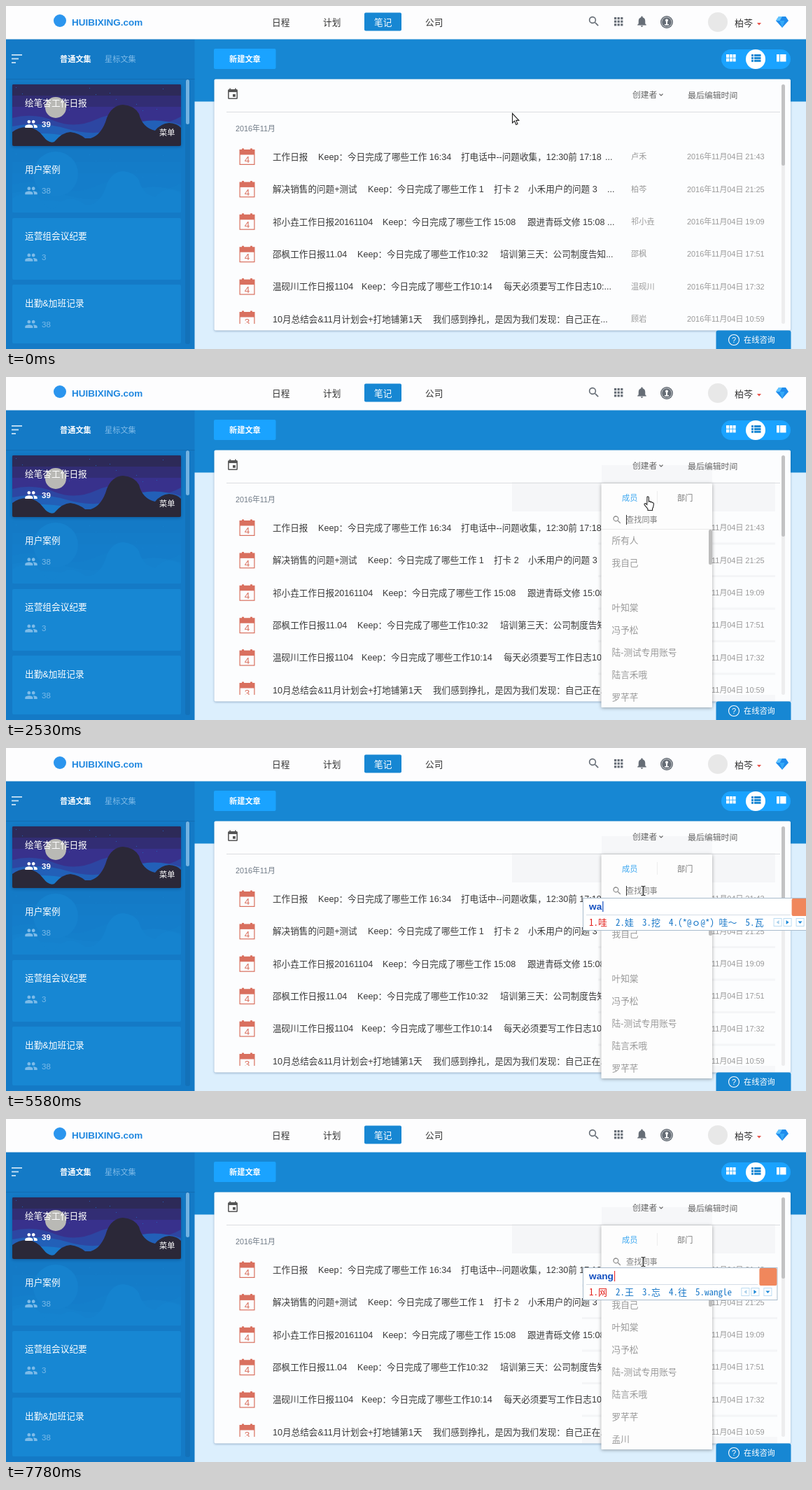
Animation, 1143 px wide and 490 px high, one loop 8 s. Source, as an HTML page with a canvas:

```html
<!DOCTYPE html>
<html lang="zh-CN">
<head>
<meta charset="utf-8">
<style>
html, body { margin: 0; width: 100%; height: 100%; overflow: hidden; }
canvas { display: block; }
</style>
</head>
<body>
<canvas id="stage" width="1143" height="490"></canvas>
<script>
const ctx = document.getElementById('stage').getContext('2d');
const LOOP = 8000;
const SANS = '"Liberation Sans", "Noto Sans CJK SC", "Noto Sans CJK", sans-serif';
const MONO = '"Noto Sans Mono CJK SC", "Noto Sans CJK SC", monospace';
const BLUE = '#1787d3', BRIGHT = '#1aa3ff', RED = '#d9705f';

const ICONS = {
  people: 'M16 11c1.66 0 3-1.34 3-3s-1.34-3-3-3-3 1.34-3 3 1.34 3 3 3zm-8 0c1.66 0 3-1.34 3-3S9.66 5 8 5 5 6.34 5 8s1.34 3 3 3zm0 2c-2.33 0-7 1.17-7 3.5V19h14v-2.5c0-2.33-4.67-3.5-7-3.5zm8 0c-.3 0-.6 0-1 .05 1.2.84 2 1.97 2 3.45V19h6v-2.5c0-2.33-4.67-3.5-7-3.5z',
  search: 'M15.5 14h-.8l-.3-.3A6.5 6.5 0 1 0 13.7 14.4l.3.3v.8l5 5 1.5-1.5zm-6 0a4.5 4.5 0 1 1 0-9 4.5 4.5 0 0 1 0 9z',
  bell: 'M12 22c1.1 0 2-.9 2-2h-4c0 1.1.9 2 2 2zm6-6v-5c0-3-1.6-5.6-4.5-6.3V4a1.5 1.5 0 0 0-3 0v.7C7.6 5.4 6 7.9 6 11v5l-2 2v1h16v-1z',
  event: 'M17 12h-5v5h5zM16 1v2H8V1H6v2H5a2 2 0 0 0-2 2v14a2 2 0 0 0 2 2h14a2 2 0 0 0 2-2V5a2 2 0 0 0-2-2h-1V1zm3 18H5V8h14z'
};

const CURSORS = {
  arrow: 'M.5.5V14L3.6 11.2 5.8 16.4 8 15.4 5.8 10.4H9.8Z',
  hand: 'M5 1.2C6 .4 7.4 1 7.4 2.4V8C8.4 7.2 9.8 7.6 10 8.7 11 8 12.2 8.5 12.4 9.6 13.6 9.2 14.6 10 14.5 11.4L13.6 16.4 12.6 18V20.5H6V18.4L1.2 12.6C.4 11.2 2 10 3.2 11L4.8 12.4Z'
};

const ENTRIES = [
  ['卢禾', '21:43', [381, '工作日报'], [446, 'Keep：今日完成了哪些工作 16:34'], [650, '打电话中--问题收集，12:30前 17:18'], [856, '...']],
  ['柏芩', '21:25', [381, '解决销售的问题+测试'], [517, 'Keep：今日完成了哪些工作 1'], [697, '打卡 2'], [746, '小禾用户的问题 3'], [859, '...']],
  ['祁小垚', '19:09', [381, '祁小垚工作日报20161104'], [538, 'Keep：今日完成了哪些工作 15:08'], [745, '跟进青砾文修 15:08 ...']],
  ['邵枫', '17:51', [381, '邵枫工作日报11.04'], [502, 'Keep：今日完成了哪些工作10:32'], [706, '培训第三天：公司制度告知...']],
  ['温砚川', '17:32', [381, '温砚川工作日报1104'], [508, 'Keep：今日完成了哪些工作10:14'], [711, '每天必须要写工作日志10:...']],
  ['顾岩', '10:59', [381, '10月总结会&11月计划会+打地铺第1天'], [610, '我们感到挣扎，是因为我们发现：自己正在...']]
];

const MEMBERS = ['叶知棠', '冯予松', '陆-测试专用账号', '陆言禾哦', '罗芊芊', '孟川'];
const EVERYONE = ['所有人', '我自己'];
const LISTS = [
  [0, [...EVERYONE, '', ...MEMBERS.slice(0, 5)]],
  [6150, ['王知砚', '王予禾', '王芊棠']],
  [7080, [...EVERYONE, ...MEMBERS]]
];

const CANDIDATES = {
  w: ['我', '为', '无', '完', '玩'],
  wa: ['哇', '娃', '挖', '(*@ｏ@*) 哇～', '瓦'],
  wan: ['玩', '万', '完', '晚', '弯'],
  wang: ['网', '王', '忘', '往', 'wangle']
};

// [time, x, y, typed letters]
const IME = [
  [0], [5330, 886, 214, 'w'], [5580, 824, 214, 'wa'], [5730, 824, 214, 'wan'], [5880, 824, 214, 'wang'],
  [6150], [7390, 886, 212, 'w'], [7540, 824, 212, 'wa'], [7660, 824, 212, 'wan'], [7780, 824, 212, 'wang']
];

// [time, kind, x, y]
const POINTER = [
  [0, 'arrow', 723, 153], [680, 'arrow', 790, 185], [800, 'arrow', 868, 196], [920, 'arrow', 902, 161],
  [1070, 'arrow', 907, 149], [1190, 'arrow', 909, 138], [1310, 'hand', 908, 127], [1460, 'hand', 908, 126],
  [2290, 'hand', 909, 138], [2410, 'hand', 910, 156], [2530, 'hand', 911, 170],
  [2650, 'beam', 910, 201], [2800, 'beam', 910, 197]
];

// [on, off, x]
const CARET = [
  [2170, 2650, 886], [3230, 3750, 886], [4310, 4770, 886], [5330, 5880, 886],
  [6150, 6680, 899], [7080, 7660, 886]
];

const stateAt = (steps, t) => steps.findLast(s => s[0] <= t);

function rect(x, y, w, h, color, radius = 0) {
  ctx.fillStyle = color;
  ctx.beginPath();
  ctx.roundRect(x, y, w, h, radius);
  ctx.fill();
}

function circle(x, y, r, color) {
  ctx.fillStyle = color;
  ctx.beginPath();
  ctx.arc(x, y, r, 0, 7);
  ctx.fill();
}

// cy is the vertical centre of the glyphs
function text(s, x, cy, color, size = 12.7, weight = 400, family = SANS) {
  ctx.font = `${weight} ${size}px ${family}`;
  ctx.fillStyle = color;
  ctx.fillText(s, x, cy + size * 0.38);
}

function path(d, x, y, fill, stroke, scale = 1) {
  const shape = new Path2D(d);
  ctx.save();
  ctx.translate(x, y);
  ctx.scale(scale, scale);
  if (fill) { ctx.fillStyle = fill; ctx.fill(shape); }
  if (stroke) { ctx.strokeStyle = stroke; ctx.stroke(shape); }
  ctx.restore();
}

const icon = (name, cx, cy, size, color) =>
  path(ICONS[name], cx - size / 2, cy - size / 2, color, null, size / 24);

function shadow(color, blur, dy = 1) {
  ctx.shadowColor = color;
  ctx.shadowBlur = blur;
  ctx.shadowOffsetY = dy;
}
const noShadow = () => shadow('transparent', 0, 0);

function header() {
  rect(0, 0, 1143, 47.5, '#fdfdfe');
  circle(77, 21, 9, '#2b95ee');
  text('HUIBIXING.com', 94, 23, '#1f87df', 13.5, 700);
  rect(512, 9.5, 53, 26, BLUE, 2);
  ['日程', '计划', '笔记', '公司'].forEach((s, i) => text(s, 380 + 73 * i, 23, i === 2 ? '#fff' : '#333'));
  icon('search', 840, 22, 19, '#666d76');
  for (let i = 0; i < 9; i++) rect(869 + i % 3 * 4.6, 16 + Math.floor(i / 3) * 4.6, 3.2, 3.2, '#666d76');
  icon('bell', 908.5, 22, 19, '#666d76');
  circle(944, 23, 9, '#666d76');
  circle(944, 23, 7.6, '#d5d8db');
  circle(944, 23, 6.8, '#666d76');
  circle(944, 20.5, 2, '#fff');
  path('M-1 0H1V5H3V6.5H-3V5H-1Z', 944, 21, '#fff');
  circle(1017, 23, 14, '#e8e8e8');
  text('柏芩', 1041, 24, '#333', 13);
  path('M0 0H6L3 3.5Z', 1073, 24, '#e8554d');
  path('M4 0H14L18 6 9 16 0 6Z', 1100, 15, '#1f8cec');
  path('M4 0H9L5.5 6H0Z', 1100, 15, '#62c4ff');
  path('M5.5 6H12.5L9 16Z', 1100, 15, '#35a9f8');
}

const HILLS = 'M0 68Q10 60 23 61 36 63 44 74T60 82Q72 68 83 68 96 70 104 77L112 77Q128 72 135 48 142 30 158 29 174 30 181 42 186 62 204 66 212 56 224 55 236 56 241 62V88H0Z';
const WAVES = [
  'M0 48Q30 40 60 52T120 50 180 50 241 46V88H0Z',
  'M0 60Q40 52 80 64T160 60 241 58V88H0Z',
  'M0 74Q40 66 80 74T160 72 241 72V88H0Z'
];

function scenery(y, bands, waves, hills, moon, moonRadius) {
  ctx.save();
  ctx.beginPath();
  ctx.roundRect(9, y, 241, 88, 2);
  ctx.clip();
  bands.forEach((c, i) => rect(9, y + i * 16, 241, 88, c));
  for (let i = 0; i < 14; i++) rect(14 + i * 67 % 230, y + 4 + i * 23 % 38, 1, 1, waves[1]);
  WAVES.forEach((d, i) => path(d, 9, y, waves[i]));
  circle(71, y + 33, moonRadius, moon);
  path(HILLS, 9, y, hills);
  ctx.restore();
}

function sidebar() {
  rect(0, 47, 269.5, 443, '#147ac6');
  rect(0, 104, 269.5, 1, '#126db3');
  [15, 10, 6].forEach((w, i) => rect(8, 69 + i * 5.5, w, 1.8, '#c9e3f6'));
  text('普通文集', 77, 75.5, '#fff', 11.2, 700);
  text('星标文集', 141, 75.5, '#7fbbe8', 11.2);
  rect(256, 105, 7, 378, '#1371b9', 3);
  rect(257, 105, 5, 64, '#73b3e2', 2.5);

  shadow('rgba(0,40,90,.4)', 4);
  rect(9, 112, 241, 88, '#2c2a50', 2);
  noShadow();
  scenery(112, ['#2d2a58', '#322d74', '#38318c'], ['#2d46a2', '#2260b8', '#1a79cb'], '#2b2838', '#b9b9b5', 15);
  scenery(207, ['#147ac6', '#147cc8', '#147dca'], ['#147fcb', '#1581cd', '#1583cf'], '#1583cf', '#1682ce', 32);
  rect(9, 303, 241, 88, BLUE, 2);
  rect(9, 398, 241, 84, BLUE, 2);
  [['绘笔杏工作日报', 39], ['用户案例', 38], ['运营组会议纪要', 3], ['出勤&加班记录', 38]].forEach(([title, count], i) => {
    const y = 138 + i * 95.3, color = i ? '#7dbbe8' : '#fff';
    text(title, 27, y, '#fff', 12.7, 500);
    icon('people', 36, y + 30.5, 19, color);
    text(count, 51, y + 30.5, color, 11.5, i ? 400 : 700);
  });
  text('菜单', 219, 181, '#fff', 11.2);
}

function toolbar() {
  rect(269, 47, 874, 89.5, BLUE);
  rect(297, 61, 88.5, 29, BRIGHT, 2);
  text('新建文章', 319, 75.5, '#fff', 11.2, 700);
  rect(1022, 62, 99, 28, BRIGHT, 14);
  circle(1071, 76, 14, '#fff');
  for (let i = 0; i < 6; i++) rect(1029 + i % 3 * 4.8, 69 + (i > 2) * 5.6, 4, 4.8, '#fff');
  for (let i = 0; i < 3; i++) {
    rect(1065, 69 + i * 3.9, 3, 3, BLUE);
    rect(1069, 69 + i * 3.9, 9.5, 3, BLUE);
  }
  rect(1101, 69, 4, 10.5, '#fff');
  rect(1106, 69, 8.5, 10.5, '#fff');
}

function dayIcon(y, day) {
  rect(333.5, y - 10, 22, 22, RED);
  rect(334.7, y - 2.5, 19.6, 13.3, '#fcfdfe');
  rect(337, y - 11.5, 3, 3, RED);
  rect(349, y - 11.5, 3, 3, RED);
  text(day, 340.8, y + 4, RED, 13.5);
}

function panel(t) {
  shadow('rgba(0,50,100,.35)', 3);
  rect(297.5, 104.5, 823.5, 359, '#fcfdfe', 2);
  noShadow();
  const open = t >= 2170, late = t >= 6150;
  if (open) {
    const x = late ? 823 : 846, w = (late ? 1102 : 1099) - x;
    rect(723, 150, 376, 42, '#f5f6f8');
    rect(851, 126, 158, 26, '#f6f7f9');
    for (let i = 0; i < 5; i++) rect(x, 236.5 + i * 46.5, w, 3, '#f4f5f7');
    rect(x, 454, w, 9, '#f6f7f9');
  } else if (t >= 680) {
    rect(723, 153, 361, 39, '#f5f6f8');
  }
  icon('event', 324, 126, 18.5, '#555');
  text('创建者', 895, 127, '#666', 11.8);
  path('M0 0L2.5 2.5 5 0', 933.5, 125.5, null, '#666');
  text('最后编辑时间', 974, 127, '#666', 11.9);
  rect(315, 151, 791, 1, '#dcdee1');
  rect(1108, 112, 5, 342, '#ededee', 2.5);
  rect(1108, 112, 5, 116, '#c2c2c3', 2.5);
  text('2016年11月', 328, 175, '#6f7a86', 10.8);

  ctx.save();
  ctx.beginPath();
  ctx.rect(297, 190, 824, 264);
  ctx.clip();
  ENTRIES.forEach(([author, time, ...parts], i) => {
    const y = 215 + i * 46.4;
    dayIcon(y, i < 5 ? '4' : '3');
    for (const [x, s] of parts) text(s, x, y, '#383838', 12.6);
    text(author, 893, y, '#999', 11.2);
    text('2016年11月04日 ' + time, 973, y, '#999', 10.9);
  });
  ctx.restore();
}

function support() {
  rect(1014.5, 463.5, 107, 30, BLUE, 3);
  ctx.strokeStyle = '#fff';
  ctx.beginPath();
  ctx.arc(1040, 477, 7.5, 0, 7);
  ctx.stroke();
  text('?', 1037, 477, '#fff', 11);
  text('在线咨询', 1054, 477, '#fff', 11.2);
}

function dropdown(t) {
  const filtered = t >= 6150 && t < 7080;
  shadow('rgba(0,0,0,.35)', 5);
  rect(850.5, 152, 158.5, 320, '#fdfdfd', 1);
  noShadow();
  text('成员', 880, 172.5, '#3ea8f0', 11.2, 500);
  text('部门', 959, 172.5, '#777', 11.2);
  rect(930, 163, 1, 18, '#eee');
  icon('search', 873, 204, 15, '#888');
  text(filtered ? '王' : '查找同事', 886, 204, filtered ? '#444' : '#808080', 11.2);
  rect(851, 217, 158, 1, '#eaeaea');
  stateAt(LISTS, t)[1].forEach((s, i) => text(s, 865.5, 233 + i * 32, '#999'));
  if (!filtered) rect(1004, 218, 5, 50, '#bdbdbd', 2);
  const caret = CARET.find(([on, off]) => t >= on && t < off);
  if (caret) rect(caret[2], 197, 1, 14, '#333');
}

const halfWidths = s => [...s].reduce((n, c) => n + (c.charCodeAt(0) > 255 ? 2 : 1), 0);

function inputMethod([, x, y, typed]) {
  if (!typed) return;
  const words = CANDIDATES[typed].map((s, i) => `${i + 1}.${s}`);
  const right = x + 252 + (halfWidths(words.join('')) - 20) * 6.6;
  rect(x, y, right - x, 47, '#a9bccd');
  rect(x + 1, y + 1, right - x - 2, 45, '#fff');
  rect(x + 5, y + 24, right - x - 33, 1, '#d4dde6');
  text(typed, x + 9, y + 12, '#1450c0', 13.7, 700);
  rect(x + 10 + ctx.measureText(typed).width, y + 5, 1.2, 15, typed === 'wang' ? '#e33' : '#1450c0');
  let left = x + 9;
  words.forEach((s, i) => {
    text(s, left, y + 35, i ? '#1a78c8' : '#e3201b', 13, 400, MONO);
    left += halfWidths(s) * 6.5 + 12;
  });
  ['M2 -3V3L-2 0Z', 'M-2 -3V3L2 0Z', 'M-3 -1.5H3L0 2Z'].forEach((d, i) => {
    const cx = right - [46, 32, 14][i];
    rect(cx - 6, y + 29, 12, 12, '#bcdcf2');
    rect(cx - 5, y + 30, 10, 10, '#fff');
    path(d, cx, y + 35, i ? '#1a88d8' : '#a8cfea');
  });
  rect(right - 26, y + 1, 25, 25, '#f0875c', 2);
}

function pointer([, kind, x, y]) {
  if (kind === 'beam') path('M-3 .5H-1L0 1.5 1 .5H3M0 1.5V12.5M-3 13.5H-1L0 12.5 1 13.5H3', x + .5, y, null, '#222');
  else path(CURSORS[kind], x, y, '#fff', '#222');
}

function draw() {
  const t = performance.now() % LOOP;
  ctx.lineWidth = 1.1;
  rect(0, 0, 1143, 490, '#dceffd');
  toolbar();
  sidebar();
  header();
  panel(t);
  support();
  if (t >= 2170) dropdown(t);
  inputMethod(stateAt(IME, t));
  pointer(stateAt(POINTER, t));
  requestAnimationFrame(draw);
}
draw();
</script>
</body>
</html>
```
